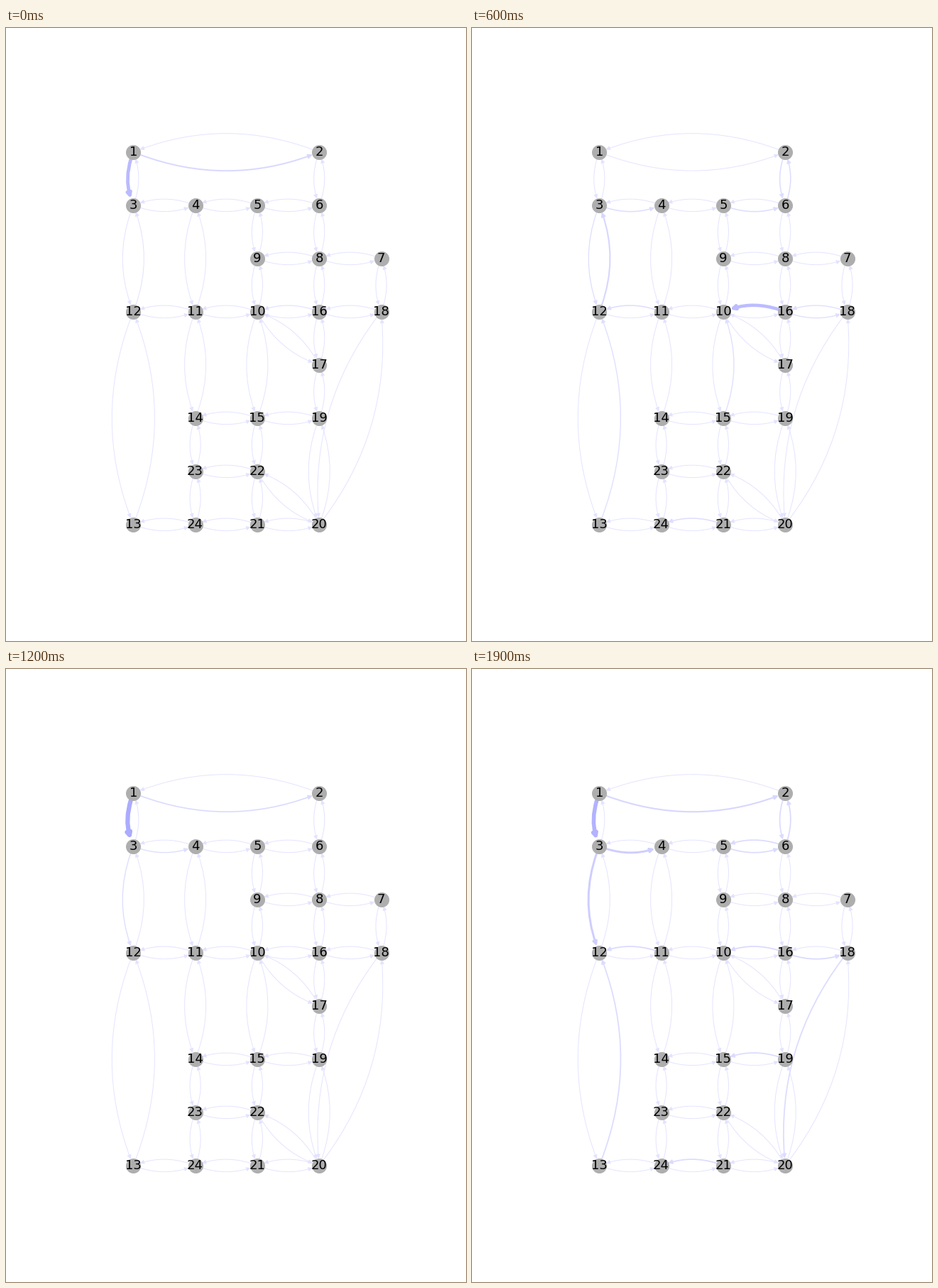
Recreate the animation shown at these times as a matplotlib script. Size 648 px wide and 864 px high, loop 2 s.

```python
import math

import matplotlib.pyplot as plt
from matplotlib.animation import FuncAnimation
from matplotlib.patches import FancyArrowPatch

W, H, DPI = 648, 864, 72
FRAMES, INTERVAL = 20, 100
BLANK = 11          # the network vanishes for this step, then a new run starts
IDLE = 0.95         # line width of an empty road

# street grid, 0 = no junction
GRID = [
    [1, 0, 0, 2, 0],
    [3, 4, 5, 6, 0],
    [0, 0, 9, 8, 7],
    [12, 11, 10, 16, 18],
    [0, 0, 0, 17, 0],
    [0, 14, 15, 19, 0],
    [0, 23, 22, 0, 0],
    [13, 24, 21, 20, 0],
]
DIAGONALS = [(10, 17), (18, 20), (20, 22)]


def hops(route):
    return list(zip(route, route[1:]))


def network():
    """Join neighbours along every row and column, in both directions."""
    pairs = list(DIAGONALS)
    for line in GRID + list(zip(*GRID)):
        pairs += hops([n for n in line if n])
    return pairs + [(b, a) for a, b in pairs]


# waves of traffic: peak step, duration, height, routes
FAST_RUN = [
    (0, 1.8, 3.8, [(1, 3)]),
    (0, 1.8, 1.0, [(1, 2)]),
    (4.4, 1.7, 5.7, [(16, 10)]),
    (4.4, 1.7, 1.8, [(12, 3)]),
    (4.4, 1.7, 0.9, [(2, 6, 2), (5, 6), (3, 4), (11, 12), (21, 24)]),
    (4.4, 1.7, 0.6, [(3, 12), (16, 18, 16), (15, 10), (13, 12)]),
]
SLOW_RUN = [
    (15.2, 4, 7.2, [(1, 3)]),
    (16.5, 4, 1.4, [(1, 2)]),
    (19, 4, 2.0, [(3, 4), (3, 12)]),
    (18, 2.5, 0.9, [(6, 2), (11, 12), (16, 10), (16, 18)]),
    (19, 2, 0.75, [(2, 6), (5, 6, 5), (18, 20), (19, 15), (13, 12), (21, 24)]),
]


def swell(i, peak, duration):
    return math.exp(-((i - peak) / duration) ** 2 / 2)


def flows(i):
    load = {}
    for peak, duration, height, routes in FAST_RUN if i < BLANK else SLOW_RUN:
        for route in routes:
            for edge in hops(route):
                load[edge] = load.get(edge, 0) + height * swell(i, peak, duration)
    return load


def shade(width):
    fade = 1 - (0.07 + 0.042 * width)
    return (fade, fade, 1)


fig = plt.figure(figsize=(W / DPI, H / DPI), dpi=DPI, facecolor="white")
ax = fig.add_axes([0, 0, 1, 1])
ax.set_xlim(0, W)
ax.set_ylim(0, H)
ax.axis("off")

pos = {n: (179.3 + 87.3 * col, H - 174.9 - 75 * row)
       for row, line in enumerate(GRID) for col, n in enumerate(line) if n}
arrows = {
    (a, b): ax.add_patch(FancyArrowPatch(
        pos[a], pos[b], arrowstyle="-|>", mutation_scale=12,
        connectionstyle="arc3,rad=0.2", shrinkA=10, shrinkB=10, zorder=1))
    for a, b in network()
}
nodes = ax.scatter(*zip(*pos.values()), s=400, c="#aeaeae", linewidths=1,
                   zorder=2)
labels = [ax.text(x, y, str(n), size=18, family="DejaVu Sans", color="black",
                  ha="center", va="center", zorder=3)
          for n, (x, y) in pos.items()]
artists = [*arrows.values(), nodes, *labels]


def update(i):
    for artist in artists:
        artist.set_visible(i != BLANK)
    load = flows(i)
    for edge, arrow in arrows.items():
        width = IDLE + load.get(edge, 0)
        arrow.set_linewidth(width)
        arrow.set_color(shade(width))
    return artists


anim = FuncAnimation(fig, update, frames=FRAMES, interval=INTERVAL,
                     init_func=lambda: update(0), repeat=True, repeat_delay=0)
plt.show()
```
